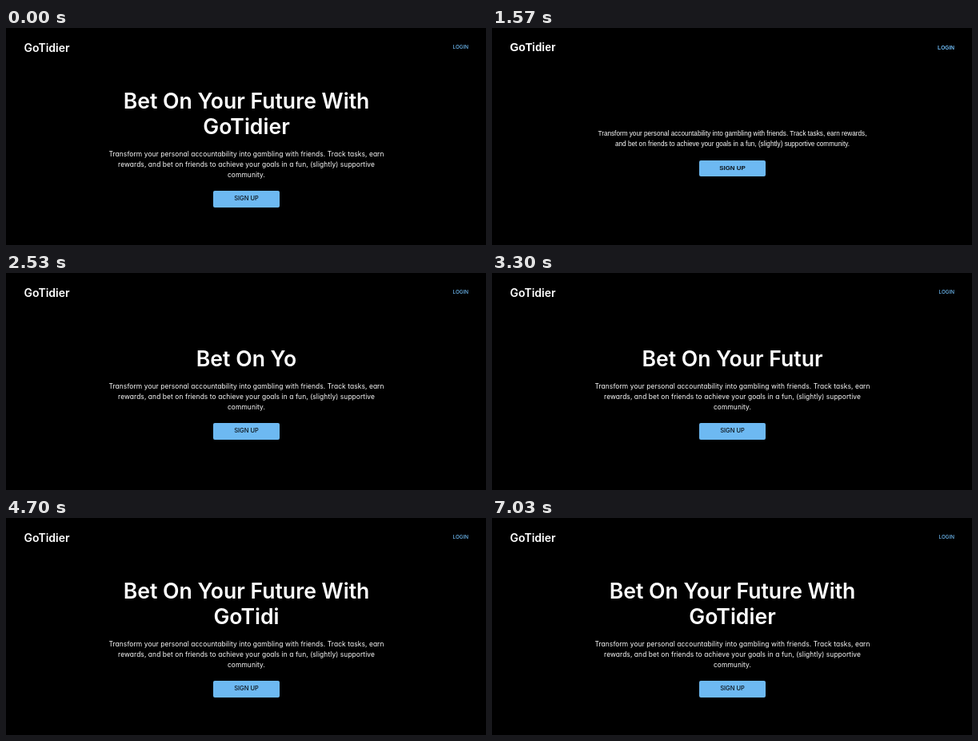
These frames come from a looping animation (600x272 px, 7.07 s). An HTML page:

```html
<!DOCTYPE html>
<html lang="en">
<head>
<meta charset="utf-8">
<title>GoTidier</title>
<style>
  html, body { margin: 0; width: 100%; height: 100%; overflow: hidden; background: #000; }
  #page {
    position: relative; width: 600px; height: 272px; overflow: hidden;
    color: #fff; font-family: Inter, sans-serif;
    font-optical-sizing: none; font-feature-settings: "cv11";
  }
  #logo, #login { position: absolute; top: 13.5px; line-height: 21px; }
  #logo { left: 22.5px; font-size: 14px; font-weight: 600; }
  #login { right: 22px; font-size: 6.3px; font-weight: 500; color: #6db9f2; }
  main {
    position: absolute; top: 27.5px; left: 0; width: 601px; height: 244.5px;
    display: flex; flex-direction: column; align-items: center; justify-content: center;
    text-align: center; white-space: pre;
  }
  h1 { margin: 0; font-size: 26.6px; font-weight: 600; line-height: 32px; }
  p { margin: 12.5px 0 13.5px; font-size: 8.4px; line-height: 13px; letter-spacing: .1px; }
  #button {
    width: 82.5px; height: 20.5px; border-radius: 2px; background: #6db9f2;
    color: #0b1218; font-size: 7.5px; font-weight: 500; line-height: 20.5px;
  }

  /* Look of the page before its web font arrives */
  .fallback { font-family: "Liberation Sans", Arial, sans-serif !important; }
  .fallback #logo { font-size: 13.9px; font-weight: 700; }
  .fallback #login { font-size: 6.6px; font-weight: 700; }
  .fallback p { font-size: 8.2px; letter-spacing: 0; }
  .fallback #button { font-size: 7.9px; font-weight: 700; }
</style>
</head>
<body>
<div id="page">
  <div id="logo">GoTidier</div>
  <div id="login">LOGIN</div>
  <main><h1></h1><p></p><div id="button">SIGN UP</div></main>
</div>
<script>
const LOOP = 7070;
const RELOAD = 1500, MOUNT = 1532, FONT_READY = 1600;
const CHAR_MS = 104;
const HEADING = "Bet On Your Future With\nGoTidier";
const COPY = "Transform your personal accountability into gambling with friends. Track tasks, earn\n" +
  "rewards, and bet on friends to achieve your goals in a fun, (slightly) supportive\ncommunity.";
const FALLBACK_COPY = "Transform your personal accountability into gambling with friends. Track tasks, earn rewards,\n" +
  "and bet on friends to achieve your goals in a fun, (slightly) supportive community.";

const page = document.getElementById("page");
const heading = page.querySelector("h1");
const copy = page.querySelector("p");

function setText(element, text) {
  if (element.textContent !== text) element.textContent = text;
}

function render(t) {
  const typed = t < RELOAD ? HEADING.length : Math.max(0, Math.floor((t - MOUNT) / CHAR_MS));
  const fallback = t >= MOUNT && t < FONT_READY;
  page.style.visibility = t >= RELOAD && t < MOUNT ? "hidden" : "visible";
  page.classList.toggle("fallback", fallback);
  // The second line only opens once it holds a letter
  setText(heading, HEADING.slice(0, typed).trimEnd());
  setText(copy, fallback ? FALLBACK_COPY : COPY);
}

const start = performance.now();
function tick() {
  render((performance.now() - start) % LOOP);
  requestAnimationFrame(tick);
}
tick();
</script>
</body>
</html>
```
